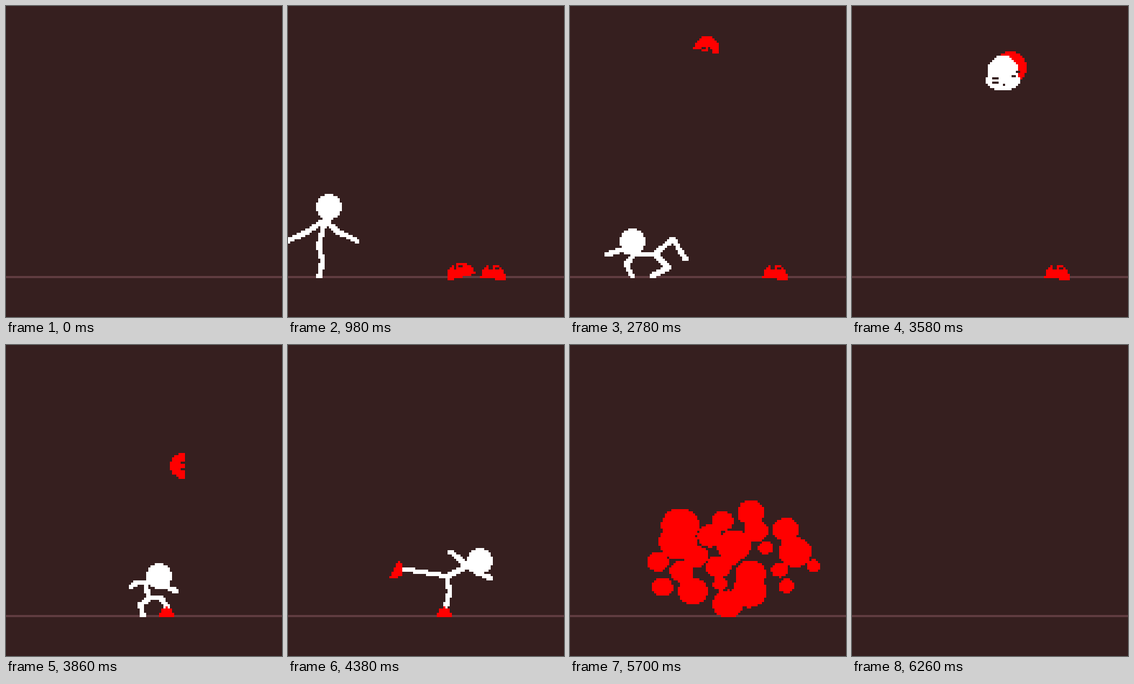
Recreate the animation shown at these times as an HTML page with a canvas. Size 512 px wide and 576 px high, loop 6500 ms.

```html
<!DOCTYPE html>
<html lang="en">
<head>
<meta charset="utf-8">
<title>Red shoes</title>
<style>
html, body { margin: 0; width: 100%; height: 100%; overflow: hidden; background: #361f1f; }
canvas { display: block; width: 512px; height: 576px; }
</style>
</head>
<body>
<canvas id="stage" width="512" height="576"></canvas>
<script>
const ctx = document.getElementById('stage').getContext('2d');
const W = 512, H = 576, CELL = 4, FLOOR = 500, LOOP = 6500;
const BG = '#361f1f', LINE = '#603c40', RED = '#ff0000', WHITE = '#ffffff';

const clamp = v => Math.max(0, Math.min(1, v));
const smooth = u => u * u * (3 - 2 * u);
const snap = v => Math.round(v / CELL) * CELL;
const mix = (a, b, u) => a.map((v, i) => v + (b[i] - v) * u);
const rand = n => { const s = Math.sin(n * 127.1 + 3.7) * 43758.5453; return s - Math.floor(s); };
const spin = (x, y, a) => [x * Math.cos(a) - y * Math.sin(a), x * Math.sin(a) + y * Math.cos(a)];

// Time advances in steps: 60 ms, then 40 in the jump, 80 in the burst, with rests between.
const beats = [[0, 0, 60], [400, 460, 60], [860, 1340, 60], [1520, 1760, 60],
  [1940, 3020, 60], [3020, 4260, 40], [4260, 4740, 60], [5140, 6260, 80]];

function tick(t) {
  const [from, to, step] = beats.filter(b => b[0] <= t).pop();
  return from + Math.floor((Math.min(t, to) - from) / step) * step;
}

// --- pixel drawing ---

function rect(x, y, w, h, color) {
  ctx.fillStyle = color;
  ctx.fillRect(x, y, w, h);
}

function cells(cx, cy, rx, ry, test, color) {
  ctx.fillStyle = color;
  for (let y = snap(cy - ry) - CELL; y <= cy + ry; y += CELL)
    for (let x = snap(cx - rx) - CELL; x <= cx + rx; x += CELL)
      if (test(x + 2 - cx, y + 2 - cy)) ctx.fillRect(x, y, CELL, CELL);
}

function oval(cx, cy, rx, ry, color, power = 2) {
  cells(cx, cy, rx, ry, (x, y) => Math.abs(x / rx) ** power + Math.abs(y / ry) ** power <= 1, color);
}

// A half dome on a flat sole, with two lace holes at height `lace` if given.
function shoe(cx, cy, w, h, turn, lace) {
  const reach = Math.max(w, h) * 0.65;
  cells(cx, cy, reach, reach, (x, y) => {
    const [u, v] = spin(x, y, -turn);
    if (v > h / 2 || (2 * u / w) ** 2 + ((h / 2 - v) / h) ** 2 > 1) return false;
    return lace === undefined || Math.hypot(Math.abs(u + 1) - 6, v - lace) > 3.5;
  }, RED);
}

function stroke(...pts) {
  ctx.fillStyle = WHITE;
  for (let i = 1; i < pts.length; i++) {
    const [x, y] = pts[i - 1], [x2, y2] = pts[i];
    const n = Math.ceil(Math.max(Math.abs(x2 - x), Math.abs(y2 - y)) / 2) || 1;
    for (let k = 0; k <= n; k++)
      ctx.fillRect(snap(x + (x2 - x) * k / n) - 4, snap(y + (y2 - y) * k / n) - 4, 8, 8);
  }
}

// The middle joint sits `bend` px beside the straight line.
function limb([ax, ay], [bx, by, bend]) {
  const dx = bx - ax, dy = by - ay, len = Math.hypot(dx, dy) || 1;
  const joint = [(ax + bx) / 2 + dy / len * bend, (ay + by) / 2 - dx / len * bend];
  stroke([ax, ay], joint, [bx, by]);
}

// --- figure: head, neck, hip as x, y; hands and feet as x, y, bend ---

const HAND = 9, BACK = 12, FRONT = 15;
const makePose = (...parts) => parts.flat();
const shift = (p, dx, dy) =>
  p.map((v, i) => i < 6 ? v + (i % 2 ? dy : dx) : v + [dx, dy, 0][i % 3]);

function walk(t) {
  const u = clamp((t - 860) / 480), swing = Math.sin(u * 15), moving = 1 - smooth(clamp(u * 2 - 1));
  const x = -10 + 190 * (1 - (1 - u) ** 1.5), s = swing * moving * 40;
  const lift = Math.max(0, Math.cos(u * 15)) * moving * 26;
  return makePose([x + 6 + 12 * moving, 372], [x + 4 + 8 * moving, 396], [x, 444],
    [x - 38 + s, 436, 4], [x + 48 - s, 434, -6],
    [x - 20 - s, FLOOR - lift, 6], [x + 24 + s, FLOOR, 6]);
}

const stand = walk(1340);
const lunge = makePose([228, 432], [202, 444], [189, 464],
  [172, 420, -6], [252, 472, 8], [148, 498, 8], [226, 500, 12]);
const prowl = makePose([116, 436], [120, 460], [158, 460],
  [68, 460, -8], [116, 500, -14], [214, 468, 33], [152, 500, 29]);
const land = makePose([284, 428], [260, 440], [264, 470],
  [232, 448, -6], [316, 456, 4], [254, 500, -11], [300, 486, 11]);
const balance = makePose([356, 396], [332, 404], [294, 428],
  [300, 382, 0], [376, 432, -2], [214, 420, 0], [292, 486, 7]);
const grab = shift(lunge, 50, 0);
const toss = shift(stand, 20, 0);
toss[HAND] = 244;
toss[HAND + 1] = 346;

const moves = [[1460, stand], [1640, lunge], [1760, grab], [1880, grab], [2240, toss], [2420, toss],
  [2720, prowl], [2840, prowl], [3060, shift(lunge, -80, 0)], [3580, shift(lunge, 52, -312)],
  [3740, land], [3900, land], [4320, balance]];

function poseAt(t) {
  if (t <= 1460) return walk(t);
  const i = moves.findIndex(m => t <= m[0]);
  if (i > 0) {
    const [t0, a] = moves[i - 1], [t1, b] = moves[i];
    return mix(a, b, smooth((t - t0) / (t1 - t0)));
  }
  const p = balance.slice(), sway = 8 * Math.sin((t - 4320) / 70) * clamp((4740 - t) / 420);
  p[1] += sway;
  p[3] += sway;
  p[BACK + 1] -= sway;
  return p;
}

function figure(p) {
  const neck = p.slice(2, 4), hip = p.slice(4, 6);
  stroke(neck, hip);
  for (const i of [6, HAND]) limb(neck, p.slice(i, i + 3));
  for (const i of [BACK, FRONT]) limb(hip, p.slice(i, i + 3));
  oval(snap(p[0]), snap(p[1]), 24, 24, WHITE);
}

function ball(t, p) {
  const x = snap(p[0]), y = snap(p[1]), turn = (t - 3580) * 0.02;
  const at = (dx, dy) => { const [a, b] = spin(dx, dy, turn); return [snap(x + a), snap(y + b)]; };
  const [rx, ry] = spin(14, -6, turn);
  oval(x + rx, y + ry, 30, 30, RED);
  oval(x, y, 28, 28, WHITE);
  oval(x, y + 18, 32, 18, WHITE);
  for (const k of [0, 1]) {
    rect(...at(-20, 12 + 8 * k), 12, 4, BG);
    rect(...at(16 + 8 * k, 8 - 8 * k), 8, 4, BG);
  }
  rect(...at(0, 24), 4, 4, BG);
}

// --- scene ---

function ground(t) {
  const amp = t >= 3740 ? 20 * clamp((3860 - t) / 120) : 0;
  for (let x = 0; x < W; x += CELL)
    rect(x, FLOOR + snap(amp * Math.cos((x - 284) / 40)), CELL, CELL, LINE);
}

function shoes(t, p) {
  if (t < 1940) {
    shoe(318, 490, 54, 26, -0.25, -7);
  } else if (t < 2240) {
    shoe(p[HAND], p[HAND + 1], 48, 28, (t - 1940) * 0.003, 10);
  } else if (t <= 3440) {
    const u = t - 2570;
    shoe(256 + (t - 2780) * 0.03, 34 + (u < 0 ? 0.0028 * u * u : 0.171 * u), 48, 28, 0.2 + (t - 2780) * 0.004, 10);
  }

  if (t >= 460 && t <= 3740) {
    shoe(382, 492, 46, 27, 0.15, -7);
  } else if (t > 3740 && t < 4300) {
    const u = t - 3880, rising = u < 0;
    const x = 318 - (t - 3860) * (rising ? 0.53 : 0.26);
    shoe(x, 218 + u * u * (rising ? 0.014 : 0.00118), 48, 28, -Math.PI / 2 - (t - 3860) * 0.006, 10);
  }

  if (t >= 3740) shoe(snap(p[FRONT]) - 2, 495, 28, 18, 0);
  if (t >= 4300) shoe(p[BACK] - 10, p[BACK + 1] + 4, 36, 18, 2.03);
}

function burst(t) {
  const age = t - 5140;
  if (age < 80) {
    oval(300, 446, 32, 18, RED, 3);
    for (const y of [440, 452]) rect(260, y, 12, 4, RED);
    rect(284, 440, 8, 8, BG);
    return;
  }
  const grow = 1 - (1 - clamp(age / 400)) ** 2;
  for (let i = 0; i < 24; i++) {
    const a = i * 2.4, d = Math.sqrt(i / 23) * grow;
    const r = (16 + 20 * rand(i)) * grow * (1 - clamp((age - 400 - rand(i + 50) * 200) / 520));
    if (r > 2) oval(300 + Math.cos(a) * d * 160, 446 - 48 * grow + Math.sin(a) * d * 90, r, r * 0.9, RED);
  }
}

function draw(now) {
  const t = tick(now % LOOP);
  rect(0, 0, W, H, BG);
  ground(t);
  if (t >= 400 && t < 6260) {
    const p = poseAt(t);
    if (t <= 5380) {
      if (t > 3440 && t < 3740) ball(t, p);
      else if (t >= 860) figure(p);
      shoes(t, p);
    }
    if (t >= 5140) burst(t);
  }
  requestAnimationFrame(draw);
}
requestAnimationFrame(draw);
</script>
</body>
</html>
```
